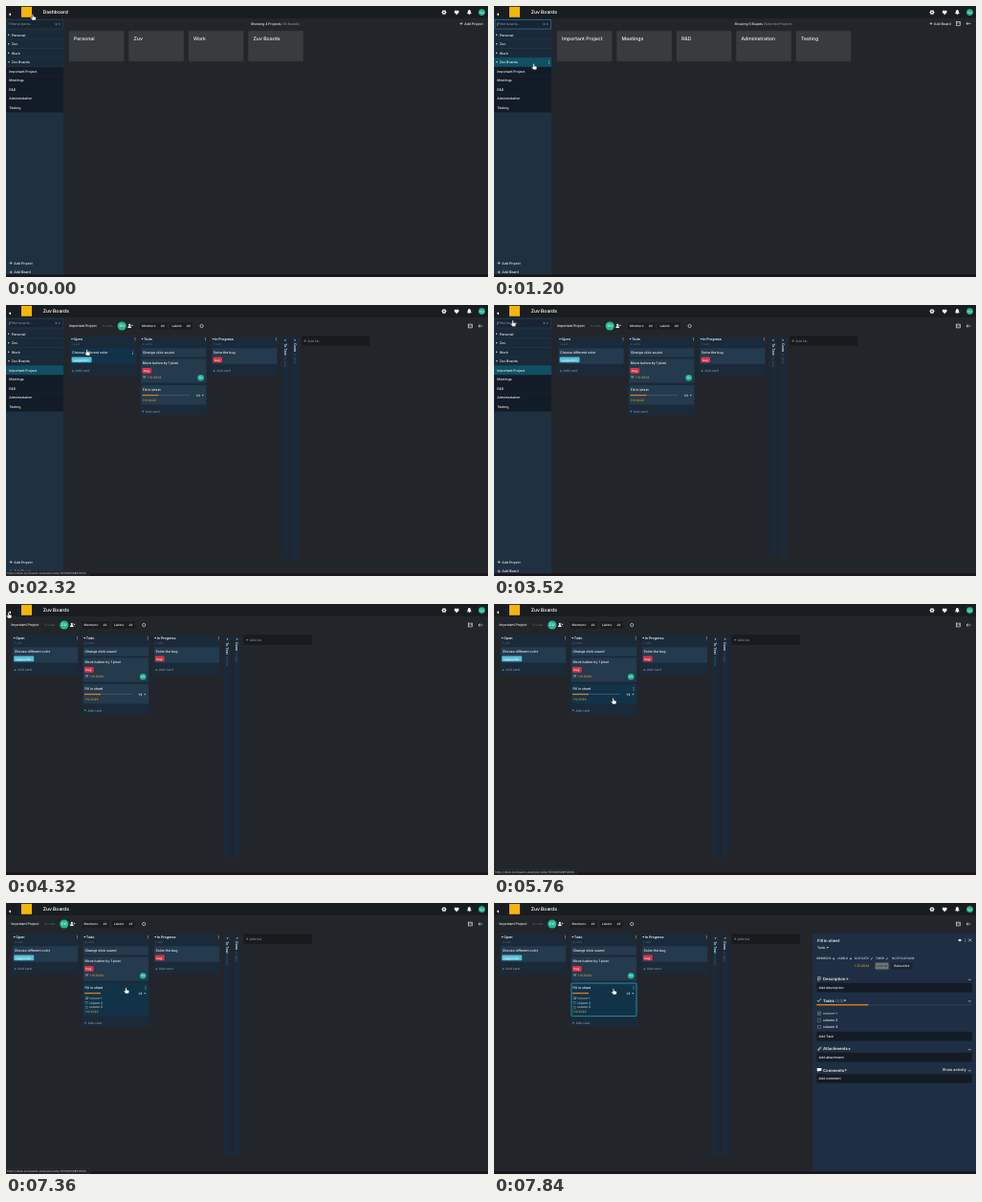
Recreate the animation shown at these times as an HTML page. Size 504x284 px, loop 8 s.

```html
<!DOCTYPE html>
<html lang="en">
<head>
<meta charset="utf-8">
<title>Board walkthrough</title>
<style>
html, body { margin: 0; width: 100%; height: 100%; overflow: hidden; background: #22262a; }
svg { display: block; width: 100vw; height: 100vh; }
text { font-family: Inter, "Open Sans", sans-serif; font-weight: 500; text-rendering: geometricPrecision; white-space: pre; }
</style>
</head>
<body>
<svg id="stage" viewBox="0 0 504 284" preserveAspectRatio="none"></svg>
<script>
const LOOP = 8000;
const C = {
  bg: '#22262a', bar: '#1a1d20', tile: '#3a3b3d', white: '#f1f3f4', dim: '#87919a', faint: '#5a656f',
  side: '#1e3142', row: '#192a39', sub: '#121c27', teal: '#0f5065', edge: '#2a8ba3',
  list: '#1a2a39', card: '#243a4d', hover: '#123347', amber: '#d9a520', orange: '#e07b1f',
  red: '#d6344c', cyan: '#55bfd6', green: '#27b592', field: '#131c25', panel: '#1e2f43'
};

// Markup helpers; text is centred vertically on y.
const rect = (x, y, w, h, fill, more = '') =>
  `<rect x="${x}" y="${y}" width="${w}" height="${h}" fill="${fill}" ${more}/>`;
const text = (x, y, s, size = 3.5, fill = C.white, more = '') =>
  `<text x="${x}" y="${y + size * 0.36}" font-size="${size}" fill="${fill}" ${more}>${s}</text>`;
const line = (d, color = C.white, w = 0.6, more = '') =>
  `<path d="${d}" fill="none" stroke="${color}" stroke-width="${w}" ${more}/>`;
const shape = (d, fill = C.white, more = '') => `<path d="${d}" fill="${fill}" ${more}/>`;
const group = (id, body) => `<g id="${id}">${body}</g>`;
const bold = 'style="font-weight:600"';
const round = 'rx="0.9"';

const plus = (x, y, r = 1.5, color = C.white) =>
  line(`M${x - r} ${y}h${2 * r}M${x} ${y - r}v${2 * r}`, color, 0.55);
const dots = (x, y, color = C.white) =>
  [-1.3, 0, 1.3].map(d => `<circle cx="${x}" cy="${y + d}" r="0.42" fill="${color}"/>`).join('');
const right = (x, y) => shape(`M${x} ${y - 1}l1.5 1l-1.5 1z`);
const down = (x, y, color = C.white) => shape(`M${x - 1} ${y - 0.6}h2l-1 1.4z`, color);
const avatar = (x, y, r) => `<circle cx="${x}" cy="${y}" r="${r}" fill="${C.green}"/>` +
  text(x, y, 'DU', r * 0.8, '#e8fff8', 'text-anchor="middle"');
const check = (x, y, on, color = C.dim, s = 2.6) =>
  rect(x, y - s / 2, s, s, 'none', `stroke="${color}" stroke-width="0.4"`) +
  (on ? line(`M${x + 0.5} ${y}l0.7 0.8l1.4 -1.9`, C.white, 0.45) : '');
const pencil = (x, y) => line(`M${x} ${y + 1}l1.6 -2.1`, C.white, 0.7);

function header() {
  const teeth = [0, 45, 90, 135].map(a =>
    rect(457.6, 4, 0.9, 5.2, C.white, `transform="rotate(${a} 458.05 6.6)"`)).join('');
  return rect(0, 0, 504, 13, C.bar) +
    shape('M5 7.2v3.2l-2.2 -1.6z') +
    rect(16, 0.8, 11, 11, '#f2b60c') +
    teeth + `<circle cx="458.05" cy="6.6" r="1.9" fill="${C.white}"/><circle cx="458.05" cy="6.6" r="0.8" fill="${C.bar}"/>` +
    shape('M471.2 9.2l-2.4 -2.5q-0.5 -2 1.2 -2.2q0.9 0 1.2 0.8q0.3 -0.8 1.2 -0.8q1.7 0.2 1.2 2.2z') +
    shape('M482 8.2q0.8 -0.8 0.8 -2.2q0.1 -1.9 1.6 -2q1.5 0.1 1.6 2q0 1.4 0.8 2.2zM483.7 8.6h1.4q-0.7 1.1 -1.4 0z') +
    avatar(497.5, 6.6, 3.4);
}

const projects = ['Personal', 'Zuv', 'Work', 'Zuv Boards'];
const boards = ['Important Project', 'Meetings', 'R&amp;D', 'Administration', 'Testing'];
const rowY = i => 25.6 + i * 9.55;

function sidebar() {
  let s = rect(0, 13, 60, 270, C.side) + rect(0, 13, 60, 12.6, C.row);
  s += rect(1, 14.4, 58.3, 9.6, '#172432', 'id="search" stroke-width="0.6"');
  s += group('phProjects', text(3, 19.2, 'Filter projects...', 3.4, C.dim));
  s += group('phBoards', line('M3.6 17.4v3.8', C.white, 0.35) + text(4.2, 19.2, 'Filter boards...', 3.4, C.dim));
  s += text(51, 19.2, '⌘ K', 3, C.dim);
  [...projects, ...boards].forEach((name, i) => {
    const y = rowY(i), top = i < 4;
    s += rect(0, y, 60, 9.55, top ? C.row : C.sub, `id="row${i}"`);
    if (top) {
      s += rect(0, y + 9.2, 60, 0.4, '#31495a');
      s += i === 3 ? down(3, y + 4.6) : right(2.2, y + 4.6);
    }
    s += text(top ? 5.8 : 3.2, y + 4.7, name);
    s += group('more' + i, dots(57.5, y + 4.7));
  });
  return s + plus(5.2, 269.4) + text(8.2, 269.4, 'Add Project') +
    plus(5.2, 279) + text(8.2, 279, 'Add Board');
}

const tiles = names => names.map((name, i) => {
  const x = 66 + i * 62.5;
  return rect(x, 26.2, 57.2, 31.6, C.tile, 'rx="1" stroke="#434446" stroke-width="0.3"') + text(x + 5, 34, name, 5.15);
}).join('');

const pageIcons = rect(483.3, 16.5, 4.4, 3.8, 'none', `stroke="${C.white}" stroke-width="0.6"`) +
  line('M483.6 17.2l1.9 1.5l1.9 -1.5', C.white, 0.5) +
  line('M498.4 18.4h-4.4m1.6 -1.6l-1.6 1.6l1.6 1.6', C.white, 0.6);

const dashboard = () => text(38.7, 6.4, 'Dashboard', 4.95, C.white, bold) +
  text(256, 18.4, `Showing 4 Projects <tspan fill="${C.dim}">(13 Boards)</tspan>`, 3.45) +
  plus(476, 18.4) + text(479.2, 18.4, 'Add Project') + tiles(projects);

const project = () => text(251.4, 18.4, `Showing 5 Boards <tspan fill="${C.dim}">(Selected Project)</tspan>`, 3.45) +
  plus(457, 18.4) + text(460, 18.4, 'Add Board') + pageIcons + tiles(boards);

// Board cards: x, y, w, h in board coordinates.
const cards = [
  [7.4, 45.2, 67.8, 16.6], [81, 45.2, 68, 9.4], [81, 56.6, 68, 25],
  [81, 84, 68, 20.6], [155, 45.2, 68, 16.6]
];
const GROW = 14;

const listHead = (x, name, count, h, id) =>
  rect(x, 32, 70.4, h, C.list, `rx="1" id="${id}"`) + down(x + 2.6, 35.7) +
  text(x + 4.2, 35.7, name, 3.6, C.white, bold) + text(x + 2.4, 41, count, 2.9, C.faint) + dots(x + 68.6, 35.7);
const addCard = (x, y) => plus(x + 1.3, y, 1.1, C.dim) + text(x + 3.8, y, 'Add card', 3.4, C.dim);
const label = (x, y, w, s, fill) => rect(x, y, w, 5.6, fill, round) + text(x + 1.6, y + 2.8, s, 3.1, '#f4f6f7');
const slim = (x, name) => rect(x, 33, 7.8, 232, C.list, 'rx="1"') + down(x + 3.9, 37) +
  `<g transform="translate(${x + 3.9} 40.3) rotate(90)">` +
  text(0, 0, `${name} <tspan dx="1.2" font-weight="400" font-size="2.9" fill="${C.faint}">0 cards</tspan>`, 3.5, C.white, bold) + '</g>';

function board() {
  const [a, b, c, d, e] = cards.map((r, i) =>
    rect(...r, C.card, `id="card${i}" rx="1" stroke-width="0.8"`) + group('dots' + i, dots(r[0] + r[2] - 3, r[1] + 5)));
  return text(5.4, 22, 'Important Project') + text(40.6, 22, '5 cards', 3, C.faint) +
    avatar(60.8, 22, 4.6) +
    `<circle cx="68.8" cy="20.9" r="1.1" fill="${C.white}"/>` + shape('M66.9 24q0 -1.9 1.9 -1.9t1.9 1.9z') + plus(71.4, 21.4, 0.8) +
    rect(79.6, 18.2, 28.6, 7.6, C.bar, round) + text(81.6, 22, 'Members:', 3.2) + text(101.4, 22, 'All', 3.2) +
    rect(110.8, 18.2, 24, 7.6, C.bar, round) + text(113, 22, 'Labels:', 3.2) + text(128.4, 22, 'All', 3.2) +
    `<circle cx="144.2" cy="22" r="1.6" fill="none" stroke="${C.white}" stroke-width="0.6"/>` +
    listHead(6, 'Open', '1 card', 42.4, 'listA') + a +
    text(8.7, 49.5, 'Choose different color') + label(8.2, 54.6, 21, 'suggestion', C.cyan) + addCard(8.4, 69.2) +
    listHead(79.6, 'Todo', '3 cards', 84, 'listB') + b + text(82.4, 49.5, 'Change click sound') +
    c + text(82.4, 61, 'Move button by 1 pixel') + label(82, 66.1, 9.6, 'bug', C.red) +
    check(83.2, 75.4, true, C.dim, 2.2) + text(87.6, 75.4, '1.10.2024', 3.2, C.amber) + avatar(143.2, 76.2, 3.3) +
    d + text(82.4, 88.3, 'Fill in sheet') +
    rect(82, 94.1, 50, 0.9, '#40566a', 'id="rail"') + rect(82, 93.9, 17, 1.3, C.orange) +
    text(138.2, 94.8, '1/3', 3.1) + down(145.3, 94.8) +
    group('tasks', [0, 1, 2].map(i => check(83.6, 99.8 + i * 4.7, i === 0, C.dim, 2.1) +
      text(87, 99.8 + i * 4.7, 'column ' + (i + 1), 3.2, i ? '#c9d0d5' : C.dim,
        i ? '' : 'text-decoration="line-through"')).join('')) +
    group('tail', text(82.2, 100, '1.10.2024', 3.2, C.amber) + addCard(81.6, 111.5)) +
    listHead(153.6, 'In Progress', '1 card', 42.4, 'listC') + e +
    text(156.4, 49.5, 'Solve the bug') + label(156, 54.6, 9.6, 'bug', C.red) + addCard(156, 69.2) +
    slim(227.6, 'To Test') + slim(237.8, 'Done') +
    rect(248.4, 32.2, 71.6, 10.8, '#181b1e', 'rx="1"') + plus(252.2, 37.6, 1.2, C.dim) + text(254.8, 37.6, 'Add list', 3.4, C.dim);
}

const section = (y, name, extra = '') => text(344, y, name + extra, 4.2, C.white, bold) +
  line(`M495.8 ${y + 0.8}h3`, C.white, 0.5);
const field = (y, s) => rect(337.4, y, 162.6, 9.6, C.field, 'rx="0.8"') + text(339.6, y + 4.8, s, 3.45);

function panel() {
  const small = (x, s) => text(x, 58.4, s, 3.05, '#d3dade');
  return rect(333, 32, 171, 250, C.panel) + text(338, 39, 'Fill in sheet', 4.3, C.white, bold) +
    shape('M485.3 39q1.8 -2.6 3.6 0q-1.8 2.6 -3.6 0z') + dots(492.6, 39) +
    line('M496.2 37.4l3 3m0 -3l-3 3') +
    text(338, 46.4, 'Todo', 3.5) + down(348.8, 46.6) +
    small(337.2, 'MEMBERS') + plus(355.2, 58.4, 1) + small(358.8, 'LABELS') + plus(373, 58.4, 1) +
    small(377, 'DUE DATE') + pencil(394, 58.4) + small(398.8, 'TIMER') + pencil(410.2, 58.4) + small(416, 'NOTIFICATIONS') +
    text(377, 66, '1.10.2024', 3.4, C.amber) +
    rect(398.6, 62.6, 14, 7, '#6d7479', round) + text(400.6, 66.1, '0:00:00', 2.8, '#26292c') +
    rect(415.6, 62.4, 22, 7.4, '#162531', round) + text(418, 66.1, 'Subscribe', 3.4) +
    line('M338 77.8h4m-4 1.6h4m-4 1.6h2.6', C.white, 0.6) + section(79.5, 'Description') + plus(369.4, 79.6, 1.1) +
    field(83.8, 'Add description') +
    line('M338 102l1.3 1.5l2.6 -3.3', C.white, 0.7) +
    section(102, 'Tasks', ` <tspan font-weight="400" fill="${C.dim}">(1/3)</tspan>`) + plus(367, 102.1, 1.1) +
    rect(337.4, 106.2, 162.6, 1, '#2d4054') + rect(337.4, 106, 54, 1.4, C.orange) +
    [0, 1, 2].map(i => check(338.4, 115.6 + i * 7.2, i === 0, '#8795a0', 3.4) +
      text(344, 115.6 + i * 7.2, 'column ' + (i + 1), 3.5, i ? C.white : '#9aa6af',
        i ? '' : 'text-decoration="line-through"')).join('') +
    field(134.8, 'Add Task') +
    line('M338.4 154l2.4 -2.8q1.4 -0.6 1.2 0.8l-2.4 2.6q-1 0.4 -0.8 -0.5l1.8 -2', C.white, 0.5) +
    section(152.8, 'Attachments') + plus(371.6, 152.9, 1.1) + field(156.8, 'Add attachment') +
    shape('M337.8 173h4.6v3h-2.6l-1.2 1.4v-1.4h-0.8z') +
    section(175, 'Comments') + plus(367.6, 175.1, 1.1) +
    text(468.8, 175, 'Show activity', 3.9) + field(179.2, 'Add comment');
}

const status = () => rect(0, 278.4, 88, 5.2, '#202124', 'stroke="#3b3d40" stroke-width="0.3"') +
  text(1, 281, 'https://desk.zuvboards.example/cards/1374160528914302', 2.95, '#aeb2b6');
const hand = () => shape('M-0.7 0.5q0.7 -1 1.4 0v2l2 0.5q0.9 0.3 0.7 1.3l-0.5 2.2h-3.2l-1.9 -2.4q-0.2 -0.9 0.6 -0.7l0.9 0.6z',
  '#fff', 'stroke="#111" stroke-width="0.4"');

document.getElementById('stage').innerHTML =
  rect(0, 0, 504, 284, C.bg) + header() +
  group('dashboard', dashboard()) +
  group('title', text(38.7, 6.4, 'Zuv Boards', 4.95, C.white, bold)) +
  group('project', project()) + group('board', board()) +
  group('boardIcons', `<g transform="translate(0 3.6)">${pageIcons}</g>`) +
  group('sidebar', sidebar()) + group('panel', panel()) +
  rect(0, 281.4, 504, 2.6, '#1b1419') + group('status', status()) + group('hand', hand());

const $ = id => document.getElementById(id);
const show = (id, on) => { $(id).style.display = on ? '' : 'none'; };
const set = (id, key, value) => $(id).setAttribute(key, value);

// Pointer path: time, x, y.
const path = [
  [0, 28, 8.4], [80, 28, 8.4], [960, 41, 60], [1200, 41.5, 60.3], [1600, 41.5, 60.3],
  [2160, 84.6, 46.6], [2560, 84.6, 46.6], [3120, 86, 40], [3680, 3.4, 10], [3920, 3.4, 10],
  [4000, 2.6, 8.4], [4480, 2.6, 8.4], [5520, 124.6, 98.4], [5760, 124.6, 98.4],
  [6240, 141, 93.8], [6560, 141, 93.8], [6800, 125.4, 88.4], [7440, 125.4, 88.4],
  [7840, 125, 89.4], [LOOP, 125, 89.4]
];

function pointer(t) {
  const i = path.findIndex((p, k) => k > 0 && t < p[0]);
  const [t0, x0, y0] = path[i - 1], [t1, x1, y1] = path[i];
  const u = (t - t0) / (t1 - t0), k = u * u * (3 - 2 * u);
  return [x0 + (x1 - x0) * k, y0 + (y1 - y0) * k];
}

function draw(t) {
  const [x, y] = pointer(t);
  const page = t < 1040 ? 'dashboard' : t < 2320 ? 'project' : 'board';
  const onBoard = page === 'board', open = t < 4320, grown = t >= 6400, panelOn = t >= 7440;
  const shift = open ? 60.4 : 0;
  const inside = ([rx, ry, w, h], dx = 0) => x >= rx + dx && x < rx + dx + w && y >= ry && y < ry + h;

  for (const id of ['dashboard', 'project', 'board']) show(id, page === id);
  show('title', page !== 'dashboard');
  show('boardIcons', onBoard);
  show('sidebar', open);
  show('panel', panelOn);

  show('phProjects', page === 'dashboard');
  show('phBoards', page !== 'dashboard');
  set('search', 'stroke', page === 'project' ? C.edge : '#2b3f50');
  for (let i = 0; i < 9; i++) {
    const over = open && inside([0, rowY(i), 60, 9.55]);
    const chosen = (page === 'project' && i === 3) || (onBoard && i === 4);
    set('row' + i, 'fill', over || chosen ? C.teal : i < 4 ? C.row : C.sub);
    show('more' + i, over && i < 4);
  }

  set('board', 'transform', `translate(${shift} 0)`);
  const extra = grown ? GROW : 0;
  let overCard = false;
  cards.forEach((r, i) => {
    const box = i === 3 ? [r[0], r[1], r[2], r[3] + extra] : r;
    const over = onBoard && inside(box, shift);
    overCard = overCard || over;
    set('card' + i, 'height', box[3]);
    set('card' + i, 'fill', over ? C.hover : C.card);
    set('card' + i, 'stroke', panelOn && i === 3 ? '#2aa5bd' : 'none');
    show('dots' + i, over);
  });
  set('listB', 'height', 84 + extra);
  set('tail', 'transform', `translate(0 ${extra})`);
  show('tasks', grown);
  show('rail', !grown);

  const overTile = page === 'project' && inside([66, 26.2, 57.2, 31.6]);
  show('status', (overCard || overTile) && !panelOn);
  set('hand', 'transform', `translate(${x} ${y})`);
}

function tick() {
  draw(performance.now() % LOOP);
  requestAnimationFrame(tick);
}
tick();
</script>
</body>
</html>
```
